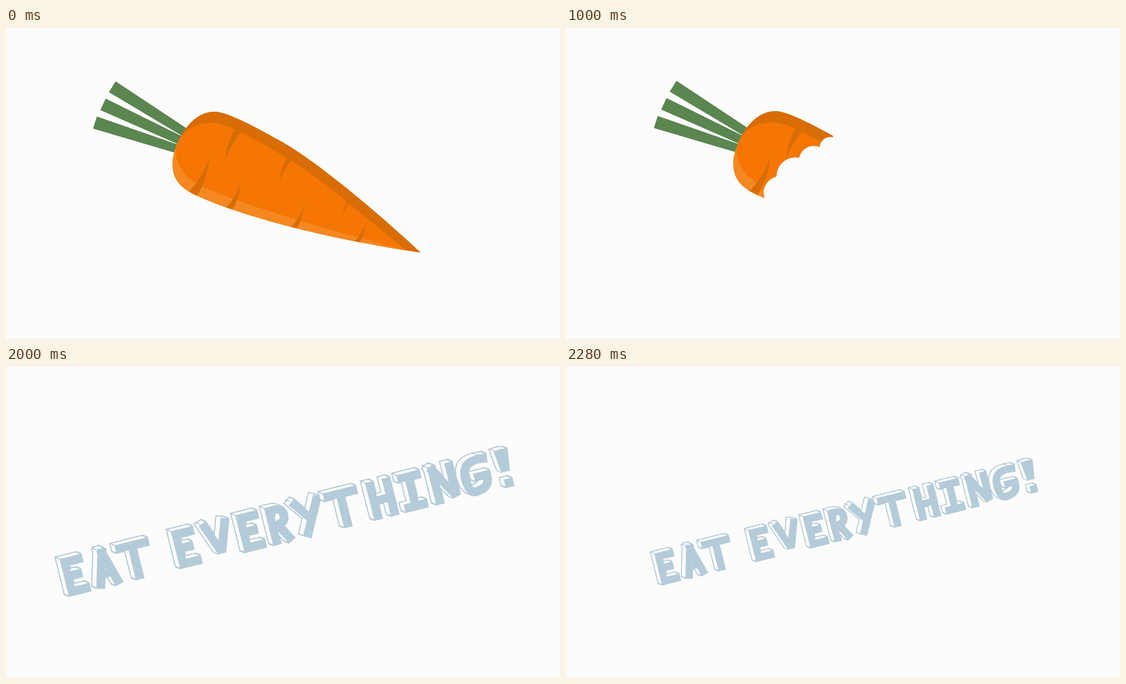
Recreate the animation shown at these times as an HTML page with a canvas. Size 998 by 561 pixels, loop 2.48 s.

```html
<!DOCTYPE html>
<html lang="en">
<head>
<meta charset="utf-8">
<title>Eat everything!</title>
<style>
html, body { margin: 0; width: 100%; height: 100%; overflow: hidden; background: #fcfcfc; }
canvas { display: block; }
</style>
</head>
<body>
<canvas id="stage" width="998" height="561"></canvas>
<script>
const W = 998, H = 561, LOOP = 2480, STEP = 40, TEXT_AT = 2000, TEXT_TIME = 280;
const PAPER = '#fcfcfc', BLUE = '#b4cbd9';
const GREEN = '#5b8650', ORANGE = '#f57604', DARK = '#d86d05', LIGHT = '#f58820';
const ctx = document.getElementById('stage').getContext('2d');

const body = new Path2D(
  'M300 246C300 215 328 151 376 151C400 151 455 182 500 207C560 242 660 324 747 405' +
  'C620 387 450 350 345 303C318 291 300 276 300 246Z');
const shade = new Path2D(
  'M306 213C318 182 345 171 372 171C400 171 460 207 520 243C580 281 640 337 722 401L760 410V100H290Z');
const shine = new Path2D(
  'M305 212C304 250 325 276 365 291C430 318 560 360 725 402V440H280V212Z');

const stalk = new Path2D('M0 -7V7L-151 10.500V-10.500Z');
const notch = new Path2D('M-7 -2Q18 -29 31 -66Q27 -25 7 6Z');
// x, y and size; a negative size hangs from the top edge
const notches = [
  [336, 298, 1], [401, 326, 0.72], [518, 361, 0.62], [632, 386, 0.54],
  [420, 184, -0.82], [511, 237, -0.6], [617, 315, -0.35]
];

// Each bite runs down through its cusps; all to the right is eaten
const states = [
  { at: 0, dx: 0, dy: 0 },
  { at: 320, dx: 0, dy: 0, fade: true, cusps: [[628, 307], [602, 327], [580, 353], [566, 373]] },
  { at: 680, dx: 0, dy: -1.5, cusps: [[540, 241], [522, 267], [517, 304], [519, 333], [523, 359]] },
  { at: 1000, dx: 1.5, dy: -1, cusps: [[481, 197], [457, 215], [420, 234], [379, 268], [359, 310]] },
  { at: 1320, dx: 1.5, dy: -1, fade: true, cusps: [[334, 184], [327, 231], [332, 266], [338, 299]] },
  { at: 1680, dx: 0, dy: -1.5, cusps: [[232, 116], [217, 128], [200, 135], [178, 152], [176, 163], [165, 185]] }
];

function bite(cusps) {
  let [x, y] = cusps[0];
  let d = `M${x} 0V${y}`;
  for (const [nx, ny] of cusps.slice(1)) {
    const r = 0.65 * Math.hypot(nx - x, ny - y);
    d += `A${r} ${r} 0 0 0 ${nx} ${ny}`;
    [x, y] = [nx, ny];
  }
  return new Path2D(d + `V${H}H${W}V0Z`);
}

function carrot({ dx, dy, cusps }) {
  const layer = document.createElement('canvas');
  layer.width = W;
  layer.height = H;
  const g = layer.getContext('2d');
  const paint = (path, color, x = 0, y = 0, size = 1, turn = 0) => {
    g.save();
    g.translate(x, y);
    g.rotate(turn * Math.PI / 180);
    g.scale(size, size);
    g.fillStyle = g.strokeStyle = color;
    g.fill(path);
    if (path === stalk) g.stroke(path);
    g.restore();
  };
  g.save();
  g.translate(dx, dy);
  g.lineJoin = 'round';
  g.lineWidth = 2;
  for (let i = 0; i < 3; i++) paint(stalk, GREEN, 320 - 7.5 * i, 187 + 15 * i, 1, 32.2 - 7.2 * i);
  paint(body, ORANGE);
  g.clip(body);
  paint(shine, LIGHT);
  paint(shade, DARK);
  for (const place of notches) paint(notch, DARK, ...place);
  g.restore();
  if (cusps) {
    g.globalCompositeOperation = 'destination-out';
    g.fill(bite(cusps));
  }
  return layer;
}
const carrots = states.map(carrot);

// Advance and centre lines of each letter
const WEIGHT = 12.5, DEPTH_X = -6, DEPTH_Y = -4.5;
const glyphs = {
  E: [45, 'M0 0V46H22M0 0H21M0 22H15'],
  A: [41, 'M13 0L0 46M13 0L26 46M6 32H20'],
  T: [66.5, 'M0 0H39M19 0V46'],
  V: [56, 'M0 0L16 43 31 0'],
  R: [40, 'M0 0V46M0 0H8Q20 0 20 11T8 24H2M8 24L20 46'],
  Y: [52, 'M0 0L16 22M34 0L10 46'],
  H: [49, 'M0 0V46M26 0V46M0 24H26'],
  I: [48, 'M0 0H23M11 0V46M0 46H23'],
  N: [46, 'M0 0V46M0 0L27 46V0'],
  G: [59, 'M33 0Q0 -4 0 24T18 46Q34 44 33 26H20'],
  '!': [20, 'M0 0L3 28 7 0M4 46h.1'],
  ' ': [22, 'M0 0']
};

function letter(line) {
  const path = new Path2D(line);
  const draw = (color, grow, k) => {
    ctx.save();
    ctx.translate(DEPTH_X * k, DEPTH_Y * k);
    ctx.strokeStyle = color;
    ctx.lineWidth = WEIGHT + grow;
    ctx.stroke(path);
    ctx.restore();
  };
  for (const [color, grow] of [[BLUE, 2], [PAPER, -1.5]]) {
    for (let k = 1; k >= 0; k -= 1 / 8) draw(color, grow, k);
  }
  // Edge between the top and the side
  const [x, y] = line.match(/\d+/g).map(n => n - WEIGHT / 2);
  ctx.lineWidth = 1.5;
  ctx.strokeStyle = BLUE;
  ctx.beginPath();
  ctx.moveTo(x, y);
  ctx.lineTo(x + DEPTH_X, y + DEPTH_Y);
  ctx.stroke();
  draw(BLUE, 0, 0);
}

function slogan(p) {
  const size = 1 + 0.184 * (1 - p) ** 1.84;
  ctx.save();
  ctx.translate(498, 282);
  ctx.rotate(-14 * Math.PI / 180);
  ctx.scale(size, size);
  ctx.translate(-336, -23);
  ctx.lineCap = 'square';
  ctx.miterLimit = 2;
  for (const ch of 'EAT EVERYTHING!') {
    const [advance, line] = glyphs[ch];
    if (ch !== ' ') letter(line);
    ctx.translate(advance, 0);
  }
  ctx.restore();
}

function show(n, alpha = 1) {
  ctx.globalAlpha = alpha;
  ctx.drawImage(carrots[n], 0, 0);
  ctx.globalAlpha = 1;
}

function frame(now) {
  const t = Math.floor(now % LOOP / STEP) * STEP;
  ctx.fillStyle = PAPER;
  ctx.fillRect(0, 0, W, H);
  if (t >= TEXT_AT) return slogan(Math.min(1, (t - TEXT_AT) / TEXT_TIME));
  const n = states.filter(s => t >= s.at).length - 1;
  const fading = states[n].fade && t < states[n].at + STEP;
  if (fading) show(n - 1, 0.24);
  show(n, fading ? 0.67 : 1);
}

let begin;
function tick(now) {
  begin ??= now;
  frame(now - begin);
  requestAnimationFrame(tick);
}
frame(0);
requestAnimationFrame(tick);
</script>
</body>
</html>
```
